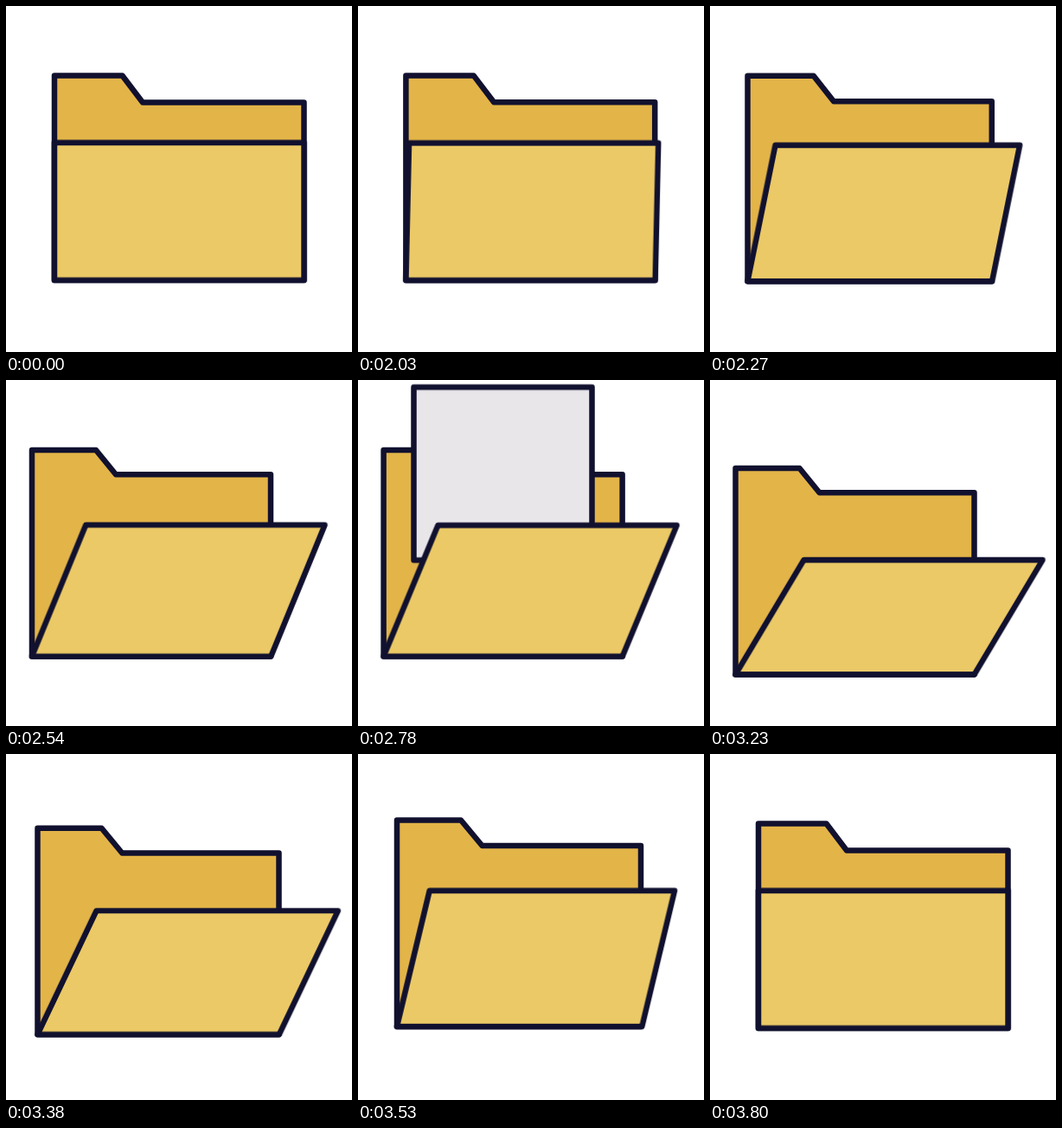
These frames come from a looping animation (400x400 px, 3.83 s). An HTML page without scripts:

```html
<!DOCTYPE html>
<html lang="en">
<head>
<meta charset="utf-8">
<title>Folder</title>
<style>
  /* folder pose: left, bottom, flap lean, flap height */
  @property --l { syntax: "<number>"; inherits: true; initial-value: 56; }
  @property --b { syntax: "<number>"; inherits: true; initial-value: 317; }
  @property --s { syntax: "<number>"; inherits: true; initial-value: 0; }
  @property --h { syntax: "<number>"; inherits: true; initial-value: 159; }

  html, body { margin: 0; width: 100%; height: 100%; overflow: hidden; background: #fff; }
  svg {
    display: block; width: 100%; height: 100%;
    stroke: #11112f; stroke-width: 6.5; stroke-linejoin: round;
    animation: pose 3830ms infinite;
  }
  .back {
    fill: #e3b448;
    d: path("M0 0V-236.5H78.5L102-205.5H288.5V0Z");
    transform: translate(calc(var(--l) * 1px), calc(var(--b) * 1px));
    animation: shape 3830ms infinite;
  }
  .paper {
    fill: #e9e6ea;
    transform: translateY(-204px);
    animation: drop 3830ms infinite;
  }
  .front {
    fill: #ebc966;
    vector-effect: non-scaling-stroke;
    transform: matrix(calc(2.622 + var(--l) * .0047), 0, calc(var(--s) / -100), calc(var(--h) / 100), var(--l), var(--b));
  }

  @keyframes pose {
    0%, 52.219% { --l: 56; --b: 317; --s: 0; --h: 159; animation-timing-function: steps(1); }
    53.003% { --l: 55.4; --b: 317; --s: 3.6; --h: 158.6; animation-timing-function: steps(8); }
    59.269% { --l: 43.5; --b: 318.2; --s: 32; --h: 157.3; animation-timing-function: steps(9); }
    66.319% { --l: 30; --b: 319.5; --s: 62.3; --h: 152; animation-timing-function: steps(10); }
    74.151% { --l: 29.5; --b: 319.5; --s: 63; --h: 151.5; animation-timing-function: steps(2); }
    75.718% { --l: 29.5; --b: 321.8; --s: 63.3; --h: 151; animation-timing-function: steps(3); }
    78.068% { --l: 29.5; --b: 331.5; --s: 64.3; --h: 149; animation-timing-function: steps(3); }
    80.418% { --l: 29.5; --b: 341.2; --s: 68; --h: 144; animation-timing-function: steps(2); }
    81.984% { --l: 29.5; --b: 343.5; --s: 72.5; --h: 139; animation-timing-function: steps(3); }
    84.334% { --l: 29.5; --b: 340.5; --s: 79; --h: 132.5; animation-timing-function: steps(2); }
    85.901% { --l: 31; --b: 334.3; --s: 83; --h: 128; animation-timing-function: steps(3); }
    88.251% { --l: 36.5; --b: 324.2; --s: 68; --h: 143; animation-timing-function: steps(2); }
    89.817% { --l: 40; --b: 318.6; --s: 56; --h: 151; animation-timing-function: steps(3); }
    92.167% { --l: 45; --b: 315; --s: 37.7; --h: 157; animation-timing-function: steps(3); }
    94.517% { --l: 49.5; --b: 315.5; --s: 22.5; --h: 158.5; animation-timing-function: steps(3); }
    96.867% { --l: 53.3; --b: 316.4; --s: 9.5; --h: 159; animation-timing-function: steps(3); }
    99.217%, 100% { --l: 56; --b: 317; --s: 0; --h: 159; animation-timing-function: steps(1); }
  }
  @keyframes shape {
    0%, 52.219% { d: path("M0 0V-236.5H78.5L102-205.5H288.5V0Z"); animation-timing-function: steps(18); }
    66.319%, 84.334% { d: path("M0 0V-238.5H74L97-210.3H276V0Z"); animation-timing-function: steps(10); }
    92.167% { d: path("M0 0V-238.5H74L98.5-209H282V0Z"); animation-timing-function: steps(9); }
    99.217%, 100% { d: path("M0 0V-236.5H78.5L102-205.5H288.5V0Z"); }
  }
  @keyframes drop {
    0%, 66.319% { transform: translateY(-204px); animation-timing-function: steps(15); }
    78.068% { transform: translateY(194px); animation-timing-function: steps(4); }
    81.201% { transform: translateY(305px); animation-timing-function: steps(1); }
    81.984%, 100% { transform: translateY(-204px); }
  }
</style>
</head>
<body>
<svg viewBox="0 0 400 400">
  <clipPath id="inside"><rect width="400" height="320"/></clipPath>
  <path class="back"/>
  <g clip-path="url(#inside)">
    <rect class="paper" x="64.5" width="206" height="200"/>
  </g>
  <rect class="front" y="-100" width="100" height="100"/>
</svg>
</body>
</html>
```
